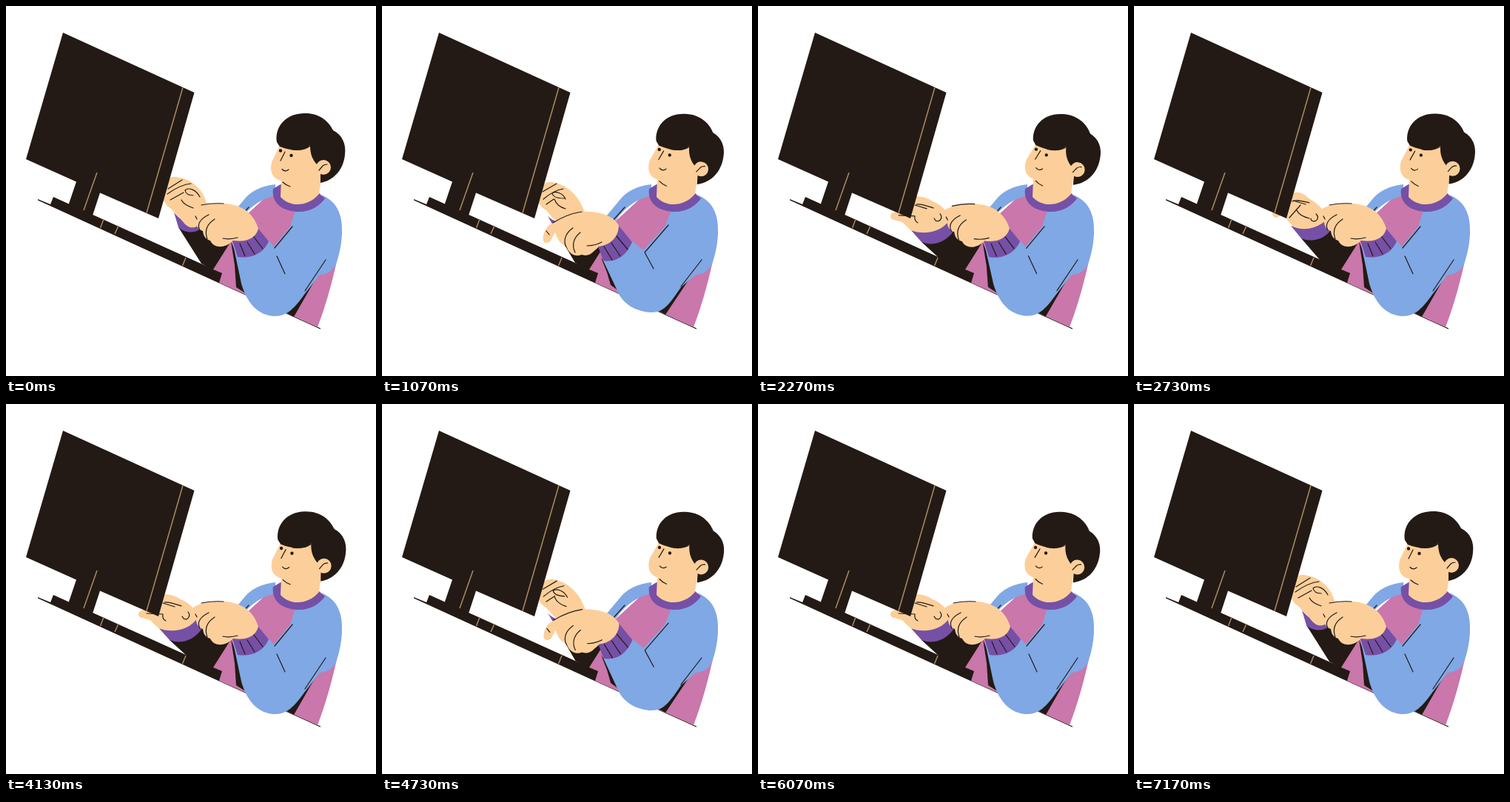
Animation of 500x500 px, one loop 7.21 s. Source, as an HTML page:

```html
<!DOCTYPE html>
<html lang="en">
<head>
<meta charset="utf-8">
<title>Typing at a desk</title>
<style>
  html, body { margin: 0; width: 100%; height: 100%; overflow: hidden; background: #fff; }
  svg { display: block; width: 100%; height: 100%; }
  .dark { fill: #231a15; }
  .skin { fill: #fccf9a; }
  .blue { fill: #7fa8e5; }
  .pink { fill: #ca77ab; }
  .purple { fill: #7650a6; }
  .ink, .tan { fill: none; stroke: #231a15; stroke-width: 1.2; stroke-linecap: round; stroke-linejoin: round; }
  .tan { stroke: #a98a64; stroke-width: 1.5; stroke-linecap: butt; }
  #finger { fill: none; stroke: #fccf9a; stroke-width: 10; stroke-linecap: round; }
</style>
</head>
<body>
<svg viewBox="0 0 500 500">
  <path id="backSleeve" class="dark"/>
  <path id="backCuff" class="purple"/>
  <path id="finger"/>
  <path id="backHand" class="skin"/>
  <path id="backLines" class="ink"/>

  <!-- desk and monitor -->
  <path class="dark" d="M43 261L60 268L64 258L293 361.500L290 374L425 435.5L425 436.8L288 374.5L43 262.5Z"/>
  <path class="dark" d="M77 36L254.500 117L206 287L127 252.500L117 283L84 270L95 237.500L27 207Z"/>
  <path class="tan" d="M239 110L190 279.500M123 225L105 276M132 288L127.500 300M152 297L147 308M243 340L238.500 351"/>

  <!-- torso -->
  <path class="pink" d="M360 250L300 305L304 318L280 356L292 361L288 374L421 434Q436 395 447 345L430 260Z"/>
  <path class="blue" d="M364 241C345 243 332 250 324 259L298 290L311 298Q330 264 364 256Z"/>
  <path class="ink" d="M328 272L301 302"/>
  <path id="leftGap" class="dark"/>
  <path id="rightGap" class="dark"/>
  <path id="sleeve" class="blue"/>
  <path class="purple" d="M371 241L361 247C358 268 376 278 396 278C412 278 424 270 431 260L422 252Z"/>
  <path class="skin" d="M372 234L371 258C383 272 408 272 423 254L427 226Z"/>
  <path id="frontHand" class="skin"/>
  <path id="frontCuff" class="purple"/>
  <path id="frontLines" class="ink"/>

  <g id="head">
    <path class="skin" d="M366 178L369 190L359 211C356 224 360 233 371 236L384 243L420 240L430 190Z"/>
    <path class="dark" d="M366 184C363 165 376 146 402 145C422 144 436 155 442 168C454 174 460 186 458 201C456 222 442 236 425 239L425 227L427 209L420 214C412 205 411 196 411 188C403 197 386 196 370 190Z"/>
    <ellipse class="skin" cx="429" cy="218" rx="10" ry="10"/>
    <path class="ink" d="M423 222L428 216Q430 214 434 214M377 197L371 209M373 220.500Q377 225 382 221M374 238Q378 242 384 244M386 194Q402 196 411 189"/>
    <circle class="dark" cx="371" cy="195.500" r="2.200"/>
    <circle class="dark" cx="385.500" cy="202" r="2.200"/>
  </g>
</svg>
<script>
const LOOP = 7210, CYCLE = LOOP / 2;
const $ = id => document.getElementById(id);

// Far arm: raised, mid, high, tapping, reaching
const back = {
  backSleeve: [
    "M233 299L264 348L292 364L306 316L262 300Z",
    "M232 298L261 347L292 364L306 316L262 300Z",
    "M236 292L264 348L292 364L306 316L262 296Z",
    "M226 314L251 343L292 364L308 316L268 295Z",
    "M221 319L244 340L292 364L308 316L267 295Z"],
  backCuff: [
    "M227 279C238 292 250 298 264 288L262 302C252 308 240 306 233 299Z",
    "M224 284C230 290 240 296 262 290L260 302C250 306 238 304 232 298Z",
    "M226 278C234 286 244 294 262 290L260 300C250 304 240 302 235 292Z",
    "M212 297C232 304 250 300 260 286L270 295C262 316 240 320 226 314Z",
    "M205 301C226 308 248 304 259 286L269 295C260 318 238 326 221 319Z"],
  backHand: [
    "M272 270C268 248 250 234 234 232C226 229 219 232 214 240C207 258 214 268 222 273L231 283C238 286 243 306 260 297Z",
    "M275 282C268 258 252 243 234 239C226 236 219 239 214 247C205 262 214 272 222 276L232 288C240 294 256 298 270 290Z",
    "M280 278C272 250 256 237 238 232C228 230 219 232 214 240C206 256 214 266 221 270L232 281C240 288 256 298 272 290Z",
    "M264 290C258 276 248 266 236 260C228 251 218 250 213 254C209 270 206 278 206 288L215 298C228 304 246 302 260 289Z",
    "M262 290C254 274 246 268 236 264C228 258 216 256 208 258C196 262 186 270 184 281L206 303C222 309 246 308 259 289Z"],
  finger: ["M230 248L220 255", "M230 256L220 263", "M230 250L220 257", "M203 270L192 281", "M206 290L184 284"],
  backLines: [
    "M219 247L238 235M218 254C228 247 238 241 250 240M262 258C256 247 246 245 242 249C243 254 248 256 253 256M237 262C240 268 247 271 253 273M222 262L240 252",
    "M217 251L236 240M218 261C226 254 234 249 245 247M248 261C244 252 234 250 230 253C231 258 238 260 246 260M233 261C235 267 241 272 248 274M222 268L232 261",
    "M219 247L237 235M219 256C229 248 238 242 250 240M262 262C256 250 242 245 237 250C238 254 243 258 250 259M235 262C238 266 247 270 254 272M222 263L241 252",
    "M215 263L232 268M214 264C219 261 228 264 237 266M246 281C251 286 247 293 240 290C239 289 239 288 239 287M220 276C222 281 229 285 237 287M210 286L225 269",
    "M212 269L228 274M214 268C220 267 228 270 237 273M246 281C250 286 246 293 240 290C239 289 239 288 238 287M212 284C211 288 213 292 216 293M190 283L212 284"]
};

// Near arm: folded, extended
const front = {
  leftGap: [
    "M304 318L309 350L311 380L328 391L325 370Z",
    "M296 340L304 360L309 377L328 391L325 380Z"],
  rightGap: [
    "M432 345L405 384L376 413L389 420Z",
    "M430 347L400 380L370 410L383 417Z"],
  sleeve: [
    "M428 256C450 266 455 286 454 308C453 326 450 336 447 346C443 357 434 363 424 363L403 390C386 414 376 420 360 419C336 416 324 396 318 375L306 318L313 339C332 342 348 334 354 316L362 325L384 298L391 276Z",
    "M428 256C450 266 455 286 454 308C453 326 450 336 447 346C443 357 434 363 424 363L404 380C384 410 378 414 362 414C340 412 328 402 321 391L296 338L299 344C316 347 330 338 337 317L353 330L382 298L391 276Z"],
  frontHand: [
    "M341 301C334 276 312 266 290 267C276 266 258 270 252 276C248 282 252 288 256 286C260 284 256 290 257 293C258 300 262 303 266 304C267 312 270 315 276 317C281 328 296 328 307 317C324 320 338 314 341 301Z",
    "M320 297C312 281 288 277 270 278C256 280 236 288 224 298C217 306 215 320 222 320C229 320 230 312 234 306C238 318 242 322 249 324C252 334 260 340 270 336C282 340 286 330 294 325C308 324 320 312 320 297Z"],
  frontCuff: [
    "M341 301L355 318C348 334 332 342 313 339L306 317C324 320 338 314 341 301Z",
    "M320 297L338 319C330 338 316 347 299 344L292 325C308 324 320 312 320 297Z"],
  frontLines: [
    "M316 321L323 338M326 319L336 335M335 312L347 328M264 269Q278 266 294 267M274 282C264 287 257 294 262 303M282 288C271 295 268 304 272 315M293 314Q302 316 313 313M256 284L258 288M387 298L363 327M366 338L377 362M432 343L404 385",
    "M300 325L311 343M310 320L322 338M317 311L332 329M231 293Q250 281 270 278M258 300C249 306 245 315 248 324M268 306C259 313 256 323 261 333M277 324Q288 324 297 319M222 304L226 309M387 296L355 333M355 333L367 355M432 343L404 379"]
};

// [time, pose] within one cycle
const backKeys = [[0, 0], [70, 0], [370, 4], [580, 4], [1070, 1], [1280, 2], [1900, 2], [2280, 4], [2580, 4], [2730, 3], [3060, 0], [CYCLE, 0]];
const frontKeys = [[0, 0], [680, 0], [1070, 1], [1300, .82], [1900, .82], [2340, 0], [CYCLE, 0]];

const lerp = (a, b, t) => a + (b - a) * t;

function span(keys, time) {
  const i = Math.max(1, keys.findIndex(k => k[0] > time));
  const [t0, from] = keys[i - 1], [t1, to] = keys[i];
  const u = (time - t0) / (t1 - t0);
  return { from, to, t: u * u * (3 - 2 * u) };
}

function mix(a, b, t) {
  const ends = b.match(/[\d.]+/g);
  let i = 0;
  return a.replace(/[\d.]+/g, n => lerp(+n, +ends[i++], t).toFixed(2));
}

function draw(now) {
  const time = now % CYCLE;
  const b = span(backKeys, time), f = span(frontKeys, time);
  const reach = lerp(f.from, f.to, f.t);
  for (const id in back) $(id).setAttribute("d", mix(back[id][b.from], back[id][b.to], b.t));
  for (const id in front) $(id).setAttribute("d", mix(...front[id], reach));
  const tilt = 3 * (1 - Math.cos(2 * Math.PI * time / CYCLE));
  $("head").setAttribute("transform", `rotate(${tilt.toFixed(3)} 395 250)`);
}

const start = performance.now();
function tick() {
  draw(performance.now() - start);
  requestAnimationFrame(tick);
}
tick();
</script>
</body>
</html>
```
